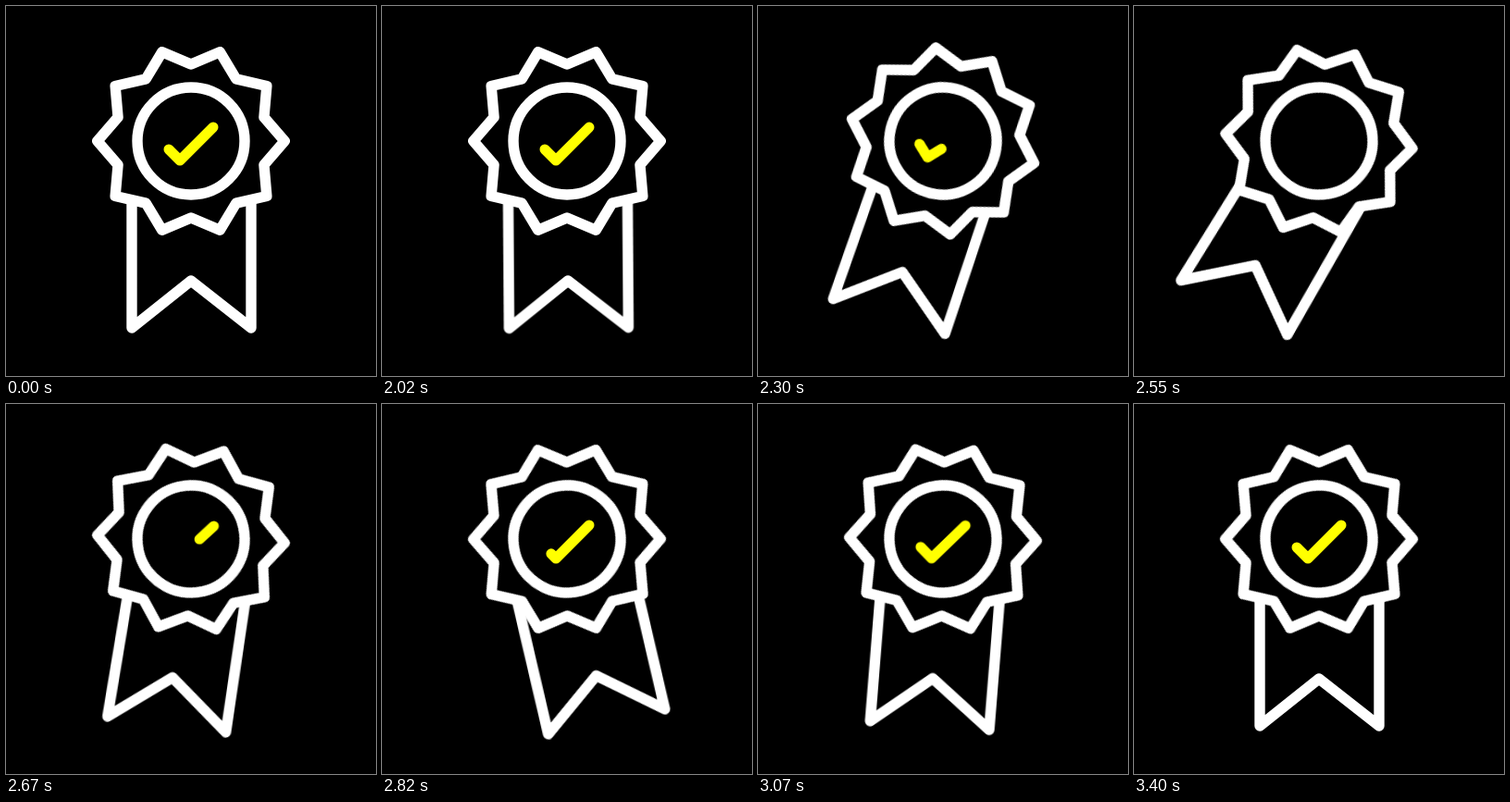
Write an HTML page that moves like this. It is 400 px wide and 400 px high and loops after 3.42 s.

```html
<!DOCTYPE html>
<html lang="en">
<head>
<meta charset="utf-8">
<title>Award badge</title>
<style>
  html, body { margin: 0; width: 100%; height: 100%; overflow: hidden; background: #000; }
  svg { display: block; width: 100vw; height: 100vh; }
  g, path, polygon, circle {
    fill: none;
    stroke-linecap: round;
    stroke-linejoin: round;
    transform-origin: 0 0;
  }
  .line { stroke: #fff; stroke-width: 11.4; }
  #star { fill: #000; }
  #check { stroke: #ff0; stroke-width: 11; stroke-dasharray: 100 200; }

  #swing, #ribbon, #badge, #upright, #check {
    animation: 3420ms linear infinite;
  }
  #swing { animation-name: swing; }
  #ribbon { animation-name: squash, bend; }
  #badge { animation-name: turn; }
  #upright { animation-name: swap; }
  #check { animation-name: trim, blink; }

  /* ribbon pendulum */
  @keyframes swing {
    0%, 59.04% { transform: rotate(0deg); }
    59.06% { transform: rotate(-.4deg); animation-timing-function: cubic-bezier(.5, 0, .55, 1); }
    73.39% { transform: rotate(28.8deg); animation-timing-function: cubic-bezier(.37, 0, .63, 1); }
    82.6% { transform: rotate(-12.1deg); animation-timing-function: cubic-bezier(.37, 0, .63, 1); }
    92.69% { transform: rotate(8deg); animation-timing-function: cubic-bezier(.37, 0, .63, 1); }
    99.42%, 100% { transform: rotate(0deg); }
  }
  @keyframes squash {
    0%, 59.06% { transform: scale(1); animation-timing-function: ease-in-out; }
    66.96% { transform: scale(.982); animation-timing-function: ease-in-out; }
    73.39%, 100% { transform: scale(1); }
  }
  /* the top of the ribbon lags behind the swing */
  @keyframes bend {
    0%, 59.06% { d: path("M-64 40L-64 202L0 151L65 202L65 40"); animation-timing-function: cubic-bezier(.7, 0, .6, 1); }
    73.39% { d: path("M-50 40L-64 202L0 151L65 202L73 40"); animation-timing-function: cubic-bezier(.37, 0, .63, 1); }
    82.6% { d: path("M-67 40L-64 202L0 151L65 202L62 40"); animation-timing-function: cubic-bezier(.37, 0, .63, 1); }
    92.69% { d: path("M-62 40L-64 202L0 151L65 202L67 40"); animation-timing-function: cubic-bezier(.37, 0, .63, 1); }
    99.42%, 100% { d: path("M-64 40L-64 202L0 151L65 202L65 40"); }
  }
  /* one tooth forward, then settle */
  @keyframes turn {
    0%, 58.77% { transform: rotate(0deg); animation-timing-function: cubic-bezier(.7, 0, .65, 1); }
    74.42% { transform: rotate(40.5deg); animation-timing-function: cubic-bezier(.4, 0, .4, 1); }
    83.63% { transform: rotate(35.8deg); animation-timing-function: ease-in-out; }
    90.06% { transform: rotate(37deg); animation-timing-function: ease-in-out; }
    99.42%, 100% { transform: rotate(36deg); }
  }
  @keyframes swap {
    0%, 74.55% { transform: rotate(0deg); }
    74.56%, 100% { transform: rotate(-36deg); }
  }
  @keyframes trim {
    0%, 58.77% { stroke-dasharray: 100 200; stroke-dashoffset: 0; animation-timing-function: cubic-bezier(.6, 0, .6, 1); }
    73.68% { stroke-dasharray: 0 200; stroke-dashoffset: 0; }
    73.69% { stroke-dasharray: 0 200; stroke-dashoffset: -100; }
    74.85% { stroke-dasharray: 0 200; stroke-dashoffset: -100; animation-timing-function: cubic-bezier(.3, 0, .27, 1); }
    87.72%, 100% { stroke-dasharray: 100 200; stroke-dashoffset: 0; }
  }
  @keyframes blink {
    0%, 73.67% { opacity: 1; }
    73.68%, 74.85% { opacity: 0; }
    74.86%, 100% { opacity: 1; }
  }
</style>
</head>
<body>
<svg viewBox="0 0 400 400">
  <g transform="translate(200 146)">
    <g id="swing">
      <path id="ribbon" class="line" d="M-64 40L-64 202L0 151L65 202L65 40"/>
    </g>
    <g id="badge">
      <polygon id="star" class="line"/>
      <circle class="line" r="58"/>
      <g id="upright">
        <path id="check" pathLength="100" d="M-24 9L-12 21L24 -15"/>
      </g>
    </g>
  </g>
</svg>
<script>
  const points = Array.from({ length: 20 }, (_, i) => {
    const r = i % 2 ? 83 : 101.2;
    const a = i * Math.PI / 10;
    return `${(r * Math.cos(a)).toFixed(2)},${(r * Math.sin(a)).toFixed(2)}`;
  });
  document.getElementById('star').setAttribute('points', points.join(' '));
</script>
</body>
</html>
```
